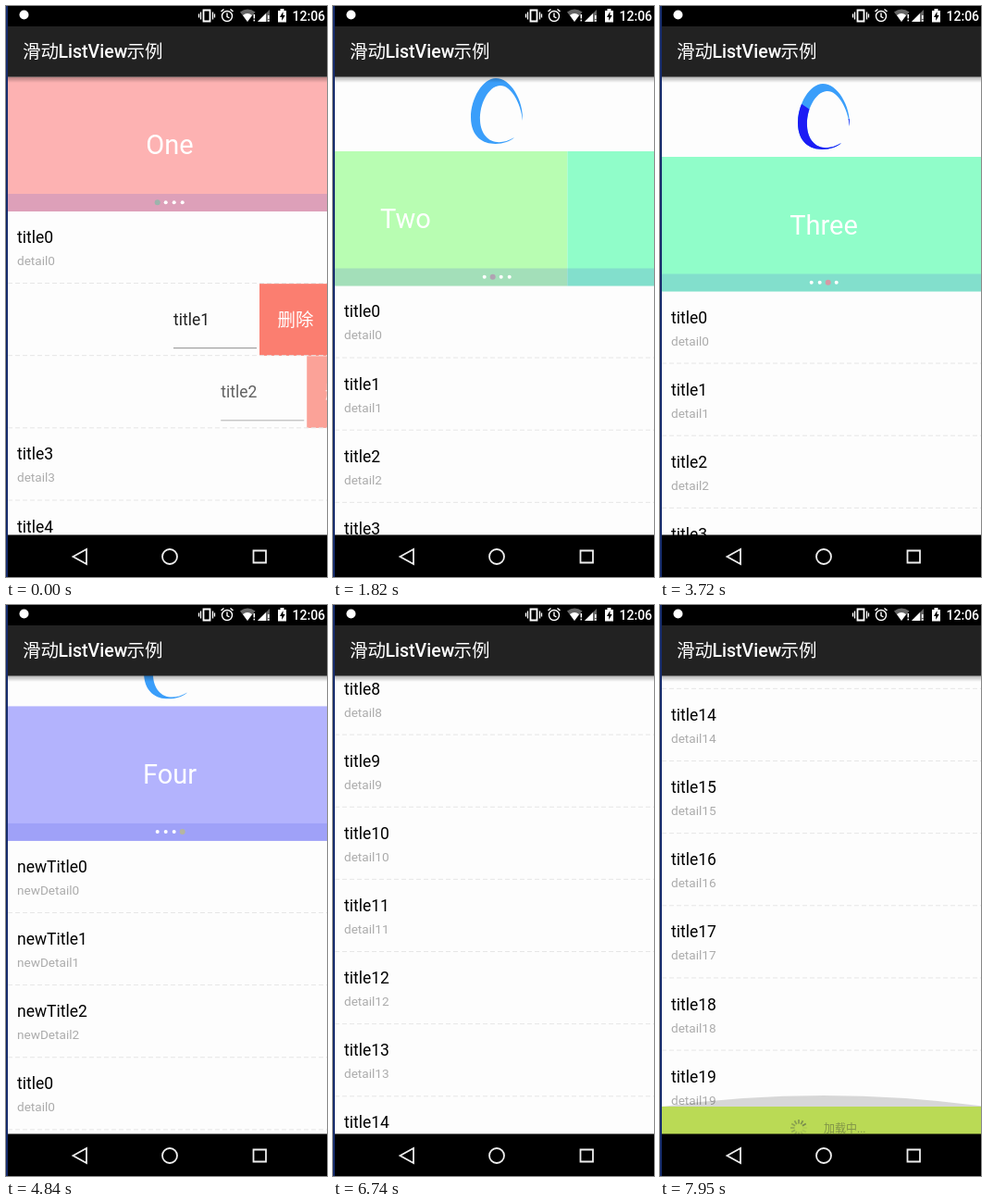
Recreate the animation shown at these times as an HTML page with a canvas. Size 347 px wide and 617 px high, loop 8000 ms.

```html
<!DOCTYPE html>
<html>
<head>
<meta charset="utf-8">
<style>
html, body { margin: 0; width: 100%; height: 100%; overflow: hidden; background: #000; }
canvas { display: block; width: 347px; height: 617px; }
</style>
</head>
<body>
<canvas id="stage"></canvas>
<script>
const LOOP = 8000, W = 347, H = 617;
const LEFT = 2, RIGHT = 352, MID = 177, TOP = 76.5;
const ROW = 78.15, HEADER = 145.5, MENU = 176;
const SANS = 'Roboto, "Noto Sans CJK SC", "Noto Sans CJK", sans-serif';
const pages = [
  ['One', '#fdb2b2', '#9db3ac'], ['Two', '#b8fdb2', '#b0a3b2'],
  ['Three', '#90fdc9', '#d59aa5'], ['Four', '#b3b3fd', '#b5b5a0']
];
const canvas = document.getElementById('stage');
const c = canvas.getContext('2d');
const dpr = window.devicePixelRatio || 1;
canvas.width = W * dpr;
canvas.height = H * dpr;

const clamp = p => Math.max(0, Math.min(1, p));
const phase = (t, a, b) => clamp((t - a) / (b - a));
const out = (p, k = 2) => 1 - (1 - p) ** k;

// Linear interpolation through [time, value] points
function track(t, points) {
  let v = points[0][1];
  for (let i = 1; i < points.length; i++) {
    const [a, from] = points[i - 1], [b, to] = points[i];
    if (t >= a) v = from + (to - from) * phase(t, a, b);
  }
  return v;
}

function rect(x, y, w, h, fill) {
  c.fillStyle = fill;
  c.fillRect(x, y, w, h);
}

function text(s, x, y, size, fill, align = 'left', weight = 400) {
  c.font = `${weight} ${size}px ${SANS}`;
  c.textAlign = align;
  c.fillStyle = fill;
  c.fillText(s, x, y);
}

function disc(x, y, r, fill) {
  c.beginPath();
  c.arc(x, y, r, 0, 7);
  c.fillStyle = fill;
  c.fill();
}

function fillPath(d, fill) {
  c.fillStyle = fill;
  c.fill(new Path2D(d));
}

function strokePath(d, stroke, width) {
  c.strokeStyle = stroke;
  c.lineWidth = width;
  c.stroke(new Path2D(d));
}

// Runs draw with its own transform, clip and alpha
function group(draw) {
  c.save();
  draw();
  c.restore();
}

const EGG = 'M196 64C186 74 149 78 149 42C149 22 162 0 176 0C192 0 206 24 205 46' +
  'C203 26 192 7 180 8C168 9 158 28 159 46C160 66 176 76 196 64Z';

function drawEgg(t, y) {
  group(() => {
    c.translate(0, y);
    fillPath(EGG, '#3a9efa');
    if (t < 2800 || t >= 4240) return;
    const sweep = 255 * out(phase(t, 2800, 4180), 1.66);
    c.beginPath();
    c.moveTo(MID, 38);
    c.arc(MID, 38, 60, 0, sweep * Math.PI / 180);
    c.clip();
    fillPath(EGG, '#1c1cf5');
  });
}

function drawHeader(t, y) {
  const pos = out(phase(t, 60, 460)) + out(phase(t, 1760, 2160)) + out(phase(t, 3780, 4180));
  pages.forEach(([name, fill], i) => {
    const x = LEFT + (i - pos) * 350;
    if (Math.abs(i - pos) >= 1) return;
    rect(x, y, 350, HEADER, fill);
    text(name, x + 175, y + 83.5, 29, '#fff', 'center');
  });
  rect(LEFT, y + 126.5, 350, HEADER - 126.5, 'rgba(60,75,219,.17)');
  const active = Math.round(pos);
  pages.forEach((p, i) => {
    const on = i === active;
    disc(163.7 + i * 9, y + 135.7, on ? 3 : 2, on ? p[2] : '#fff');
  });
}

function drawMenu(title, y, shift) {
  group(() => {
    c.globalAlpha = clamp(shift / MENU);
    c.translate(MENU - shift, y);
    text(title, 181, 45, 17.5, '#222');
    rect(181, 69, 90, 1, '#8f8f8f');
    rect(274, 0, 78, ROW - .5, '#fb7e70');
    text('删除', 313, 46, 19.5, '#fff', 'center');
  });
}

function drawRow(title, detail, y, shift) {
  if (y > 572 || y + ROW < 70) return;
  text(title, 12 - shift, y + 34, 17.5, '#000');
  text(detail, 12 - shift, y + 58, 13.6, '#acacac');
  if (shift > 6) drawMenu(title, y, shift);
  c.setLineDash([5, 3]);
  strokePath(`M2 ${y + ROW - .6}H352`, '#e6e6e6', 1);
  c.setLineDash([]);
}

function drawRows(t, y) {
  const added = t >= 4240 ? 3 : 0;
  const shifts = {
    1: MENU * (1 - out(phase(t, 60, 420))),
    2: track(t, [[0, 124.5], [180, MENU], [480, MENU], [840, 5], [880, 0]])
  };
  for (let i = 0; i < 20 + added; i++) {
    const n = i - added;
    const [a, b, k] = n < 0 ? ['newTitle', 'newDetail', i] : ['title', 'detail', n];
    drawRow(a + k, b + k, y + i * ROW, t < 1000 && shifts[n] || 0);
  }
}

function drawFooter(t) {
  const p = phase(t, 7700, 7950);
  if (!p) return;
  const y = 572 - 30 * p, edge = 572 - 30 * p;
  fillPath(`M2 ${edge}Q177 ${edge - 24 * p} 352 ${edge}V572H2Z`, 'rgba(0,0,0,.15)');
  rect(LEFT, y, 350, 46, '#bada55');
  text('加载中...', 177, y + 27.5, 12, '#809448');
  for (let i = 0; i < 12; i++) {
    group(() => {
      c.translate(150, y + 23);
      c.rotate((i + Math.floor(t / 80)) * Math.PI / 6);
      strokePath('M0 -4.5V-9', `rgba(100,115,75,${.1 + i * .06})`, 1.7);
    });
  }
}

function drawStatus() {
  rect(LEFT, 0, 350, 22, '#000');
  disc(19.5, 9.5, 5, '#fff');
  // vibrate
  strokePath('M213.5 4.5h7v12h-7z', '#fff', 1.8);
  strokePath('M210.5 6.5v8M223.5 6.5v8M208.5 8.5v4M225.5 8.5v4', '#fff', 1.3);
  // alarm
  strokePath('M244.5 11a5.5 5.5 0 1 0-11 0a5.5 5.5 0 1 0 11 0M239 7.5v4l2.5 1.5', '#fff', 1.4);
  strokePath('M232.5 6l3-2.5M245.5 6l-3-2.5', '#fff', 1.5);
  // wifi
  fillPath('M253 6.5Q261 .5 269.500 6.5L261 17Z', '#666');
  fillPath('M256 10Q261 6 266 10L261 17Z', '#fff');
  rect(267.5, 9, 1.6, 4.500, '#fff');
  rect(267.5, 14.7, 1.6, 1.700, '#fff');
  // signal
  fillPath('M272 17L285 4V17Z', '#666');
  fillPath('M272 17L281 8V17Z', '#fff');
  rect(283, 10, 1.6, 4, '#fff');
  rect(283, 15, 1.6, 1.700, '#fff');
  // battery
  fillPath('M294 5h2.500v-2h4v2h2.500v12.500h-9z', '#fff');
  fillPath('M299.500 6l-3.500 6h2.200v4l3.500-6h-2.200z', '#000');
  text('12:06', 309.5, 15.5, 14, '#fff', 'left', 500);
}

function drawBars() {
  const shade = c.createLinearGradient(0, 76, 0, 83);
  shade.addColorStop(0, 'rgba(0,0,0,.32)');
  shade.addColorStop(1, 'rgba(0,0,0,0)');
  rect(LEFT, 76, 350, 7, shade);
  rect(LEFT, 22, 350, 54.500, '#222');
  text('滑动', 18, 56, 19.5, '#fff');
  text('ListView', 56.5, 56, 19.5, '#fff', 'left', 500);
  text('示例', 130.5, 56, 19.5, '#fff');
  drawStatus();
  rect(LEFT, 571.5, 350, 46, '#000');
  strokePath('M72.500 595L87 587V603Z', '#eee', 1.8);
  strokePath('M185 595a8 8 0 1 0-16 0a8 8 0 1 0 16 0', '#eee', 1.8);
  strokePath('M267.500 588.500h13.500v13h-13.500z', '#eee', 1.8);
  rect(0, 0, LEFT, H, '#152b6c');
}

function draw(t) {
  c.setTransform(dpr, 0, 0, dpr, 0, 0);
  rect(0, 0, W, H, '#fdfdfd');
  const pull = track(t, [[800, 0], [840, 4], [1290, 75], [1760, 75], [2210, 115.5],
    [2560, 115.5], [2860, 86.5], [4452, 86.5], [5080, 0]]);
  const scroll = 220 * phase(t, 5200, 5370) + 886 * out(phase(t, 6090, 7140), 2.4) +
    353.6 * out(phase(t, 7400, 7760));
  const y = TOP + pull - scroll;
  if (pull > 5) drawEgg(t, pull - 2.5);
  drawHeader(t, y);
  drawRows(t, y + HEADER);
  drawFooter(t);
  drawBars();
}

function tick() {
  draw(performance.now() % LOOP);
  requestAnimationFrame(tick);
}
tick();
</script>
</body>
</html>
```
